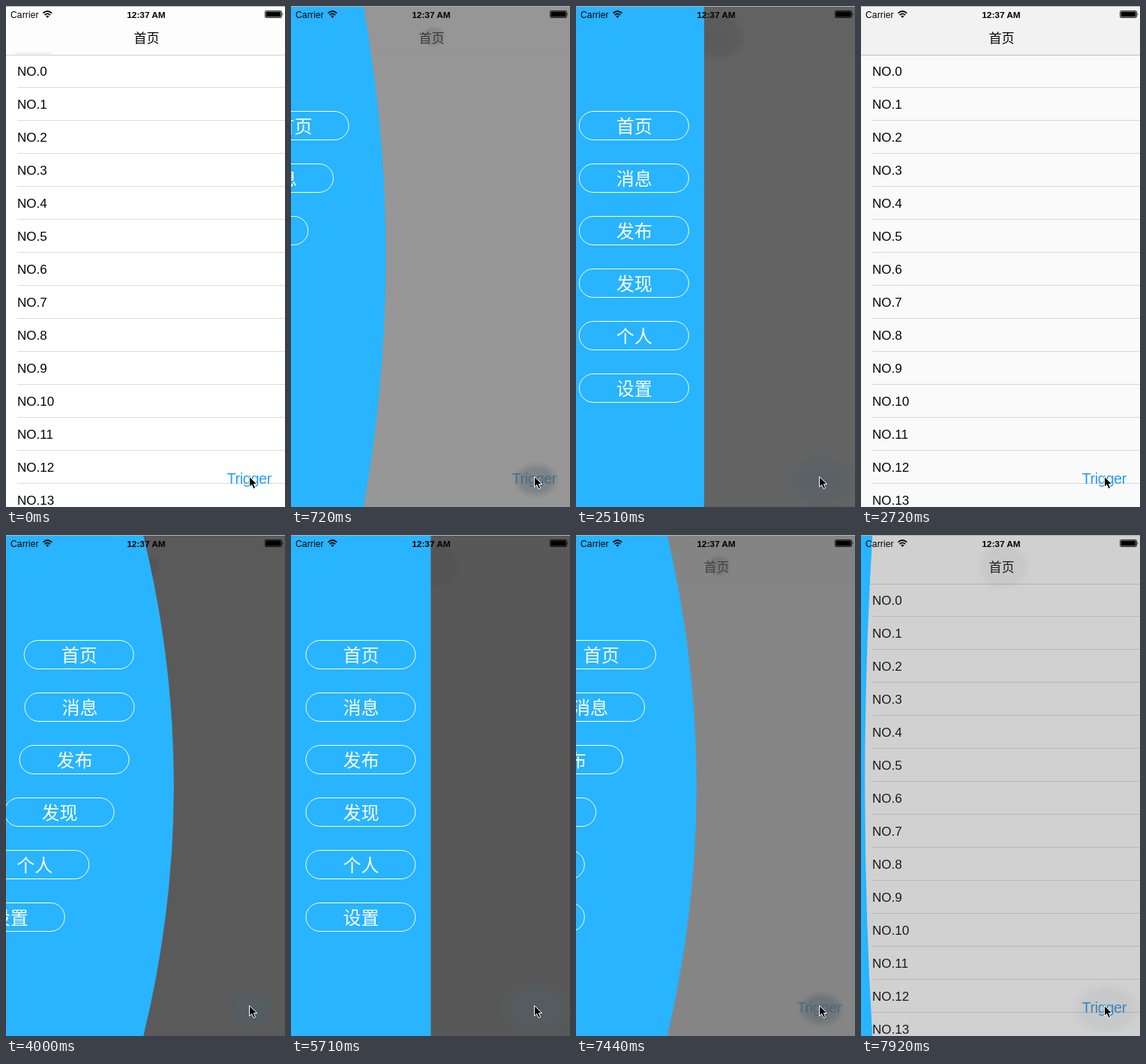
These frames come from a looping animation (372 by 668 pixels, 8000 ms). An HTML page:

```html
<!DOCTYPE html>
<html lang="zh-CN">
<head>
<meta charset="utf-8">
<title>Elastic side menu</title>
<style>
html, body { margin: 0; width: 100%; height: 100%; overflow: hidden; background: #fff; }
svg { display: block; width: 372px; height: 668px; }
text { font-family: "Liberation Sans", Arial, sans-serif; }
.cjk { font-family: "Noto Sans CJK SC", "Noto Sans CJK", sans-serif; text-anchor: middle; }
#rows text { font-size: 17px; }
#title text { font-size: 17px; font-weight: 500; }
#buttons rect { fill: none; stroke: #fff; }
#buttons text { font-size: 24px; font-weight: 300; fill: #fff; }
#trigger { font-size: 20px; letter-spacing: -.45px; fill: #2a9df4; }
</style>
</head>
<body>
<svg viewBox="0 0 372 668">
  <defs>
    <radialGradient id="teal">
      <stop offset=".6" stop-color="#4f6069" stop-opacity=".6"/>
      <stop offset="1" stop-color="#4f6069" stop-opacity="0"/>
    </radialGradient>
    <radialGradient id="dark">
      <stop offset=".7" stop-color="#4a4a4a" stop-opacity=".3"/>
      <stop offset="1" stop-color="#4a4a4a" stop-opacity="0"/>
    </radialGradient>
  </defs>
  <rect width="372" height="668" fill="#fff"/>
  <rect id="nav" width="372" height="65"/>
  <rect id="strip" x="12" y="61" width="48" height="4" fill="#f3f3f3"/>
  <g id="rows"><path id="navLine" d="M0 65.5H372" stroke="#cfcfcf"/></g>
  <g id="title"><text class="cjk" x="187.5" y="49">首页</text></g>
  <text id="trigger" x="294.5" y="637">Trigger</text>
  <rect id="mask" width="372" height="668" fill="#585858"/>
  <ellipse id="titleHalo" cx="190" cy="41" fill="url(#dark)"/>
  <ellipse id="trigHalo" cx="327" cy="632" fill="url(#teal)"/>
  <g id="menu">
    <path id="blob" fill="#28b4ff"/>
    <g id="buttons"></g>
  </g>
  <path d="M0 .5H372" stroke="#b4b4b4"/>
  <g id="status">
    <text x="6" y="16" font-size="12" letter-spacing=".15">Carrier</text>
    <text x="187" y="16" font-size="11.8" font-weight="700" text-anchor="middle">12:37 AM</text>
    <g fill="none" stroke="#000" stroke-width="1.7">
      <path d="M49.4 9.6Q55.3 4.4 61.2 9.6"/>
      <path d="M51.6 12Q55.3 8.8 59 12"/>
    </g>
    <path d="M53.2 13.6Q55.3 11.9 57.4 13.6L55.3 16Z"/>
    <rect x="345.5" y="6.5" width="22" height="9" rx="1.5" fill="none" stroke="#000" stroke-width=".8"/>
    <rect x="346.5" y="7.5" width="20" height="7" rx=".6"/>
    <path d="M368.6 9.3Q370.4 11 368.6 12.8Z"/>
  </g>
  <path d="M324.5 627.5V641.3L327.7 638.4L330 643.7L332.6 642.6L330.4 637.5H334.7Z" stroke="#fff" stroke-linejoin="round"/>
</svg>
<script>
const NS = "http://www.w3.org/2000/svg";
const LOOP = 8000, HALF = 187, EXTRA = 50, REACH = 207;
const LAG = .098;     // the curve trails the sliding panel
const DECAY = 9.87;   // settles within 0.7 s
// [begin, first visible, opening, freeze at]
const PHASES = [
  [550, 640, true, 2450],
  [2456, 2450, false, 2720],
  [3728, 3820, true, 5710],
  [5700, 5710, false, 6010],
  [7250, 7350, true, 7730],
  [7730, 7730, false, 8000]
];
const PRESSES = [500, 3670, 7200];
const LABELS = ["首页", "消息", "发布", "发现", "个人", "设置"];

const $ = id => document.getElementById(id);
const clamp = x => Math.min(1, Math.max(0, x));

function add(parent, tag, attrs, text) {
  const el = document.createElementNS(NS, tag);
  set(el, attrs);
  if (text) el.textContent = text;
  return parent.appendChild(el);
}
function set(el, attrs) {
  for (const key in attrs) el.setAttribute(key, attrs[key]);
}

for (let i = 0; i < 14; i++) {
  add($("rows"), "text", { x: 15, y: 93 + 44 * i }, "NO." + i);
  add($("rows"), "path", { d: `M15 ${108.5 + 44 * i}H372`, stroke: "#dcdcdc" });
}
const buttons = LABELS.map((label, i) => {
  const g = add($("buttons"), "g", {});
  add(g, "rect", { x: 20.5, y: 140.5 + 70 * i, width: 146, height: 38, rx: 19 });
  add(g, "text", { class: "cjk", x: 94, y: 169 + 70 * i }, label);
  return g;
});

// cubic-bezier(.42, 0, .58, 1)
function easeInOut(x) {
  x = clamp(x);
  let lo = 0, hi = 1;
  for (let i = 0; i < 24; i++) {
    const s = (lo + hi) / 2, r = 1 - s;
    if (1.26 * s * r * r + 1.74 * s * s * r + s * s * s < x) lo = s; else hi = s;
  }
  return lo * lo * (3 - 2 * lo);
}

// Remaining distance of a damped spring, 1 at rest start, 0 when settled
function spring(t, damping, velocity) {
  if (t <= 0) return 1;
  const wd = DECAY / damping * Math.sqrt(1 - damping * damping);
  return Math.exp(-DECAY * t) *
    (Math.cos(wd * t) + (DECAY - velocity) / wd * Math.sin(wd * t));
}

function draw(ms) {
  const phase = PHASES.filter(p => ms >= p[1]).pop();
  let shown = 0, bulge = 0, t = 0, opening = false;
  if (phase) {
    opening = phase[2];
    t = Math.max(0, Math.min(ms, phase[3]) - phase[0]) / 1000;
    const p = easeInOut(t / .3), late = t - LAG;
    shown = opening ? p : 1 - p;
    bulge = REACH * (opening
      ? spring(late, .8, 2) - spring(late, .5, .9)
      : spring(late, .6, .9) - spring(late, .7, 2));
  }

  const shift = -(HALF + EXTRA) * (1 - shown);
  set($("menu"), { transform: `translate(${shift})`, visibility: shown > 0 ? "visible" : "hidden" });
  set($("blob"), { d: `M0 1H${HALF}Q${HALF + bulge} 334 ${HALF} 668H0Z` });
  buttons.forEach((b, i) => {
    const x = opening ? -90 * spring(t - i * .05, .6, 0) : 0;
    set(b, { transform: `translate(${x})` });
  });

  const grey = ms >= 2450 && ms < 5710;
  set($("nav"), { fill: grey ? "#f7f7f7" : "#fdfdfd" });
  set($("navLine"), { stroke: grey ? "#c0c0c0" : "#d2d2d2" });
  set($("strip"), { opacity: shown || grey ? 0 : 1 });

  const near = clamp((1 - shown) / .27);
  const pressed = PRESSES.some(p => ms >= p && ms < p + (p === 500 ? 140 : 150));
  set($("rows"), { opacity: clamp((.7 - shown) / .42) });
  set($("title"), { opacity: near });
  set($("trigger"), { opacity: pressed ? .2 : near });
  set($("mask"), { opacity: shown });

  const grow = opening ? clamp((t - .27) / .3) : 1;
  const haze = clamp(shown * 1.1 - .1);
  set($("titleHalo"), { rx: 17 + 20 * grow, ry: 15 + 18 * grow, opacity: haze });
  set($("trigHalo"), { rx: 32 + 18 * grow, ry: 25 + 13 * grow, opacity: haze * (1 - .35 * grow) });
}

function tick() {
  draw(performance.now() % LOOP);
  requestAnimationFrame(tick);
}
tick();
</script>
</body>
</html>
```
